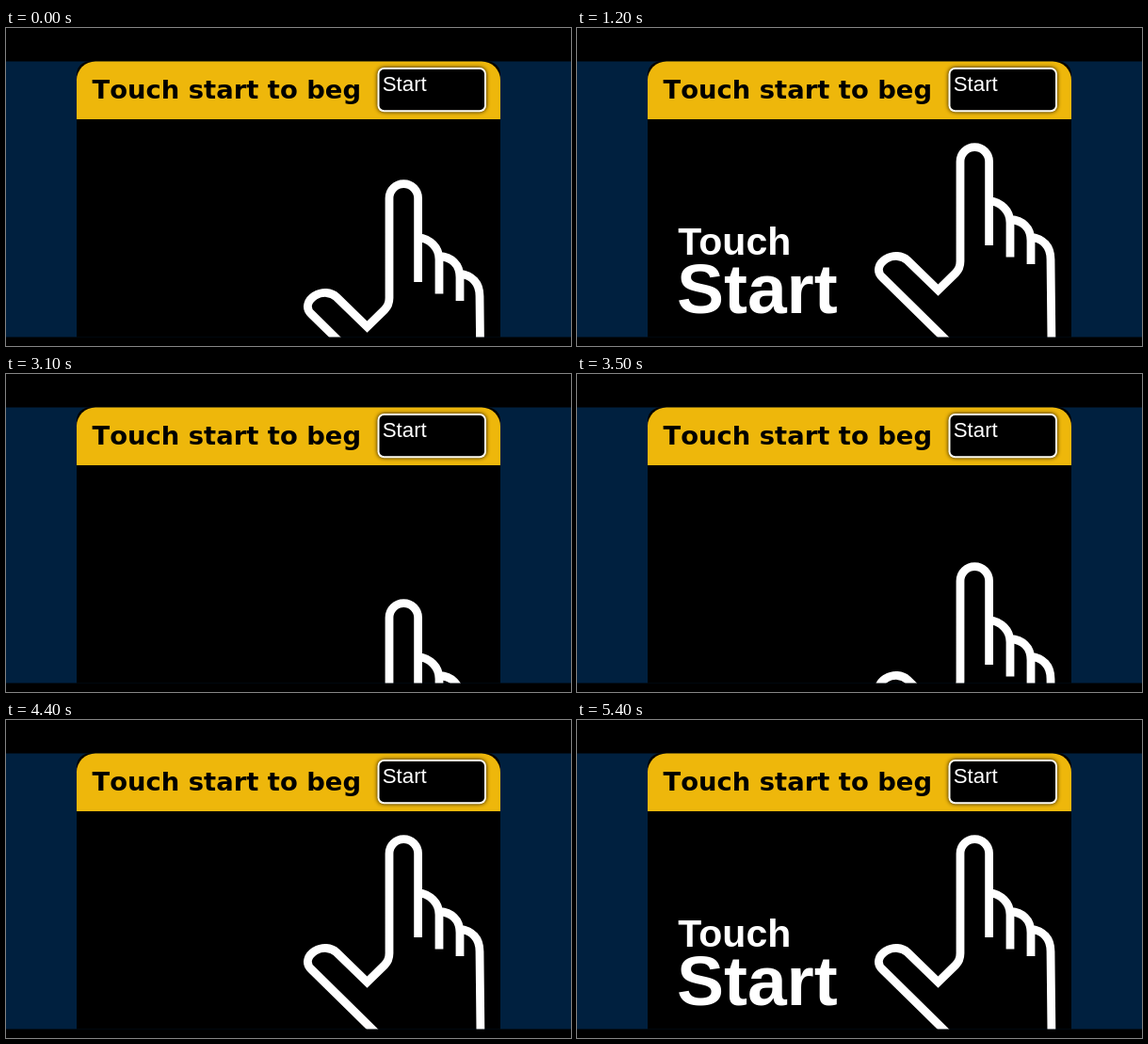
An HTML page with a canvas that plays this animation: 600x338 px, repeating every 5.5 s.

```html
<!DOCTYPE html>
<html lang="en">
<head>
<meta charset="utf-8">
<title>Touch start to begin</title>
<style>
  html, body { margin: 0; width: 100%; height: 100%; overflow: hidden; background: #000; }
  canvas { display: block; width: 600px; height: 338px; }
</style>
</head>
<body>
<canvas id="stage" width="600" height="338"></canvas>
<script>
const ctx = document.getElementById('stage').getContext('2d');
const LOOP = 5500;
const STEP = 39; // rise of the hand per beat
const TOP = 35.5;
const BOTTOM = 328.5;
const SANS = '"Liberation Sans", Arial, sans-serif';
const WIDE = '"DejaVu Sans", Verdana, sans-serif';

// Each pose holds from its start time until the next one.
const poses = [
  { at: 0, drop: 1, words: 0 },
  { at: 400, drop: 0, words: 0 },
  { at: 800, drop: 0, words: 1 },
  { at: 1200, drop: 0, words: 2 },
  { at: 3100, drop: 3, words: 0 },
  { at: 3500, drop: 2, words: 0 },
  { at: 3900, drop: 1, words: 0 },
  { at: 4300, drop: 0, words: 0 },
  { at: 4800, drop: 0, words: 1 },
  { at: 5200, drop: 0, words: 2 }
];

const hand = new Path2D(`
  M399.5 339 L324.3 265 C317 258 321 250 328 245.5 C336 241 345 241.5 351 247
  L383.5 278.7 L402 260.5 Q407 255.5 407 248 V142 A15.3 15.3 0 0 1 437.6 142 V231
  M437.6 183.5 C450 185 460 194 460 207 V243.5
  M460 203.5 C473 204.5 482 212 482 226 V251
  M482 222 C495 224 503 232 503 246 L504 339`);

function text(str, x, y, size, color, weight = 'normal', family = SANS) {
  ctx.font = `${weight} ${size}px ${family}`;
  ctx.fillStyle = color;
  ctx.fillText(str, x, y);
}

function box(x, y, w, h, radii, color) {
  ctx.beginPath();
  ctx.roundRect(x, y, w, h, radii);
  ctx.fillStyle = color;
  ctx.fill();
}

function drawTitle() {
  ctx.save();
  ctx.beginPath();
  ctx.rect(75, 36, 300, 61);
  ctx.clip();
  ctx.fontKerning = 'none';
  text('Touch start to begin', 91.5, 75, 27.4, '#000', 'bold', WIDE);
  ctx.restore();
}

function drawButton() {
  ctx.save();
  ctx.shadowColor = '#201400';
  ctx.shadowBlur = 4;
  box(394.5, 42, 115.5, 47.3, 7, '#fffdf2');
  ctx.restore();
  box(396.5, 44, 111.5, 43.3, 5, '#000');
  text('Start', 399.7, 67, 22.3, '#fff');
}

function drawScene() {
  ctx.fillStyle = '#000';
  ctx.fillRect(0, 0, 600, 338);
  ctx.fillStyle = '#00203f';
  ctx.fillRect(0, TOP, 600, BOTTOM - TOP);

  box(75, TOP, 450, BOTTOM - TOP, [14, 14, 0, 0], '#000');
  box(75, TOP, 450, 97 - TOP, [20, 20, 0, 0], '#eeb70b');

  drawTitle();
  drawButton();
}

function drawHand(drop) {
  ctx.save();
  ctx.beginPath();
  ctx.rect(75, 97, 450, BOTTOM - 97);
  ctx.clip();
  ctx.translate(0, drop * STEP);
  ctx.lineWidth = 8.8;
  ctx.strokeStyle = '#fff';
  ctx.stroke(hand);
  ctx.restore();
}

function draw(now) {
  const t = now % LOOP;
  const pose = poses.findLast(p => p.at <= t) || poses[0];
  drawScene();
  drawHand(pose.drop);
  if (pose.words > 0) text('Touch', 107.3, 241, 41, '#fff', 'bold');
  if (pose.words > 1) text('Start', 105.9, 303, 75, '#fff', 'bold');
}

const start = performance.now();
function tick() {
  draw(performance.now() - start);
  requestAnimationFrame(tick);
}
tick();
</script>
</body>
</html>
```
